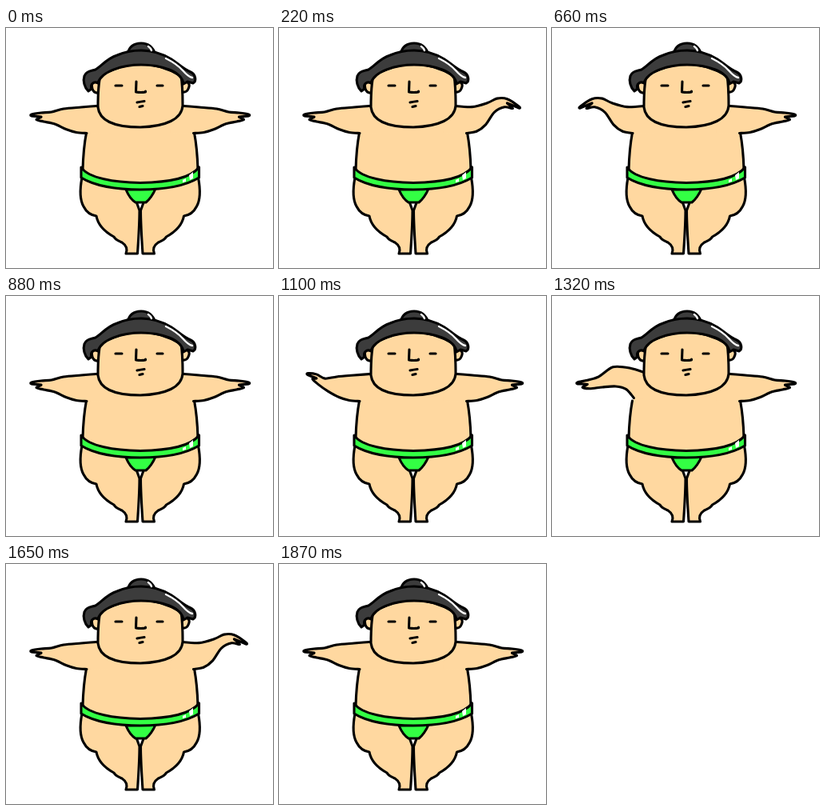
An HTML page for the animation above (1.98 s loop, 334 by 300 pixels).

```html
<!DOCTYPE html>
<html lang="en">
<head>
<meta charset="utf-8">
<title>Arm wave</title>
<style>
  html, body { margin: 0; width: 100%; height: 100%; overflow: hidden; background: #fff; }
  svg { display: block; width: 334px; height: 300px; }
  .skin { fill: #ffd8a0; }
  .hair { fill: #3c3c3c; }
  .belt { fill: #3f4; }
  .line { stroke: #000; stroke-width: 3.1; stroke-linecap: round; stroke-linejoin: round; }
  .open { fill: none; }
  .shine { fill: none; stroke: #fff; stroke-width: 2.4; stroke-linecap: round; }
</style>
</head>
<body>
<svg viewBox="0 0 334 300">
  <defs>
    <path id="leg" class="skin line" d="M95 187C92 203 93 216 97 223C101 231 106 234 113 235C115 246 124 255 135 261C137 265 141 266 145 268C151 272 152 277 150 282H164.500C166 260 167 242 167 228L163 217L150 195Z"/>
    <path id="side" class="line open" d="M100.500 131C98 144 96.500 160 96 177"/>
    <g id="arm"><path class="skin"/><path class="line open"/></g>
  </defs>

  <use href="#leg"/>
  <use href="#leg" transform="matrix(-1 0 0 1 335.500 0)"/>

  <path class="skin" d="M116 100H220L235 131C238 146 240 160 240 180Q168 208 96 180C96 160 98 146 101 131Z"/>
  <use href="#side"/>
  <use href="#side" transform="matrix(-1 0 0 1 336 0)"/>

  <use id="left" href="#arm"/>
  <use id="right" href="#arm"/>

  <path class="belt line" d="M150 202C153 209 157 215 162 218H175C181 213 184 208 187 201Z"/>
  <path class="belt line" d="M94 174C103 188 136 193 168 193.500C200 193 231 188 241.500 174V187C225 197 198 202 168 202C138 202 110 197 94 187Z"/>
  <path d="M221 190L225 188V192L221 193ZM229 184L234 180V188L230 190Z" fill="#fff"/>

  <path class="skin line" d="M115 68C108 66 106 71 108 76Q110 82 116 81M221 68C228 66 231 70 228 76Q226 81 220 80"/>
  <path class="skin line" d="M118 60C115 72 115 86 115 99C117 117 138 124 168 124C200 123 220 114 221 97C221 84 221 72 219 60Q168 30 118 60Z"/>

  <path class="hair line" d="M152 32C154 24 160 19 169 19C178 19 184 24 187 33Z"/>
  <path class="hair line" d="M103 79C98 74 96 66 98 60C100 54 106 54 112 52C119 48 126 38 139 34C148 30 158 28 169 28C182 28 194 31 207 39C215 44 221 51 231 55C237 58 239 66 234 69L227 67L222 70C220 54 194 46 169 46C146 46 119 54 115 69C110 66 105 70 107 76Z"/>
  <path class="shine" d="M178 23Q181 25 182 28M200 38Q214 45 221 53T233 62"/>

  <path class="line open" d="M137 72H145M189 72H196M164 93Q169 92 173 91.500M167 98.500L171 97.500M163 67L162.500 80Q169 81 174.500 80V79"/>
</svg>

<script>
const STEP = 110;   // ms per pose
const BEATS = 9;    // poses in one sweep across both arms

// Resting left arm: neck, fingertips, thumb, armpit.
const rest = [
  [120, 97], [94, 99], [72, 101], [57, 105], [44, 106], [32, 108], [32, 110],
  [44, 111], [38, 114.5], [47, 117], [61, 120], [75, 126.5], [88, 130.5], [101, 131.5]
];

// Bulge that lifts the hand, the wrist, then the elbow.
const bulges = [
  { x: 34, width: 17, height: 0 },
  { x: 34, width: 17, height: 11.5 },
  { x: 50, width: 23, height: 18.5 },
  { x: 82, width: 22, height: 15 }
];

function bend([x, y], { x: mid, width, height }) {
  const lift = height * Math.exp(-(((x - mid) / width) ** 2)) * Math.min(1, (118 - x) / 30);
  return [x + lift * 0.35, y - lift];
}

function smooth(pts) {
  const at = i => pts[Math.max(0, Math.min(pts.length - 1, i))];
  let d = "M" + pts[0];
  for (let i = 0; i < pts.length - 1; i++) {
    const [a, b, c, e] = [at(i - 1), at(i), at(i + 1), at(i + 2)];
    const c1 = b.map((v, k) => v + (c[k] - a[k]) / 7);
    const c2 = c.map((v, k) => v - (e[k] - b[k]) / 7);
    d += `C${c1} ${c2} ${c}`;
  }
  return d;
}

const outlines = bulges.map(b => smooth(rest.map(p => bend(p, b))));

// Each arm is its own copy, the right one mirrored.
function makeArm(id, transform) {
  const slot = document.getElementById(id);
  const arm = document.getElementById("arm").cloneNode(true);
  arm.id = id;
  arm.setAttribute("transform", transform);
  slot.replaceWith(arm);
  return arm;
}

const left = makeArm("left", "translate(0 0)");
const right = makeArm("right", "matrix(-1 0 0 1 335.5 0)");

function setPose(arm, pose) {
  const [fill, edge] = arm.children;
  fill.setAttribute("d", outlines[pose] + "L130 131V100Z");
  edge.setAttribute("d", outlines[pose]);
}

// The wave enters at one hand, passes the neck and leaves at the other hand.
const stage = beat => beat < bulges.length ? beat : 0;

function draw(time) {
  const step = Math.floor(Math.max(0, time) / STEP) % (2 * BEATS);
  const beat = step % BEATS;
  const [from, to] = step < BEATS ? [right, left] : [left, right];
  setPose(from, stage(beat));
  setPose(to, stage(BEATS - 1 - beat));
}

draw(0);
const start = performance.now();
requestAnimationFrame(function tick(now) {
  draw(now - start);
  requestAnimationFrame(tick);
});
</script>
</body>
</html>
```
